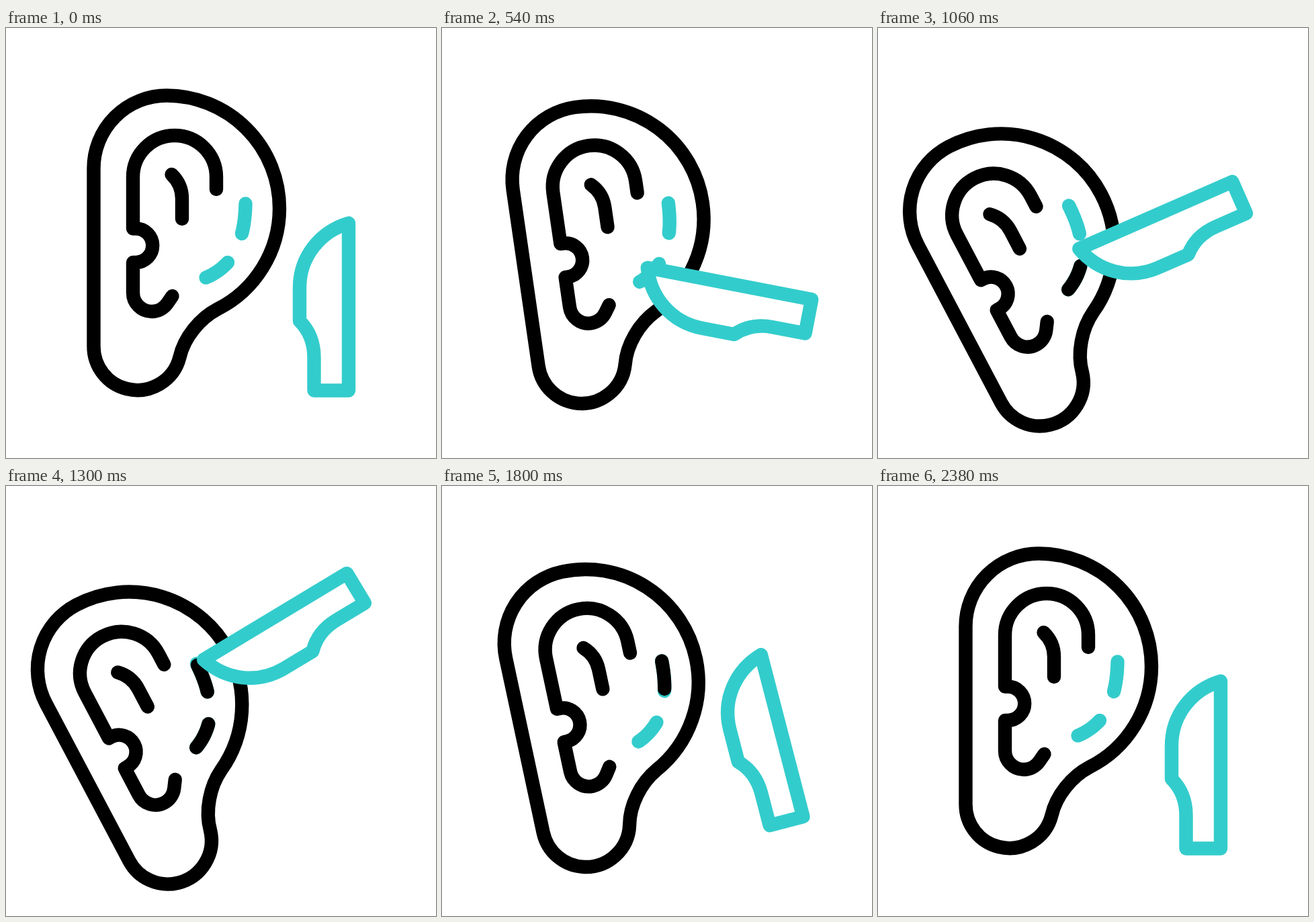
Animation of 640x640 px, one loop 2.4 s. Source, as an HTML page with a canvas:

```html
<!DOCTYPE html>
<html lang="en">
<head>
<meta charset="utf-8">
<title>Ear surgery</title>
<style>
  html, body { margin: 0; width: 100%; height: 100%; overflow: hidden; background: #fff; }
  canvas { display: block; width: 100vmin; height: 100vmin; }
</style>
</head>
<body>
<canvas id="stage" width="640" height="640"></canvas>
<script>
const ctx = document.getElementById('stage').getContext('2d');
const LOOP = 2400;
const LEAN_TIME = 1190;
const BLACK = '#000';
const TEAL = '#33cccc';
const RAD = Math.PI / 180;

const EAR_CENTER = [268, 320];
const EAR_SHIFT = [-35.2, 37.7];
const EAR_TILT = 28;
const BLADE_ANCHOR = [494.5, 512];

// Blade poses inside the ear's coordinates: time, anchor x, anchor y, tilt
const POSES = [
  [0, 494.5, 512, 0],
  [720, 518, 433.3, 77.1],
  [1040, 559.7, 357.3, 85.8],
  [1360, 591.6, 260.2, 93.5],
  [1880, 494.5, 512, 0]
];

// Quadratic curves with the spans in which the cut appears and fades
const CUTS = [
  { curve: [297.5, 371.5, 316, 364, 330, 349], draw: [720, 1040], erase: [1400, 1720] },
  { curve: [351, 306, 356, 287, 356.5, 261.5], draw: [1060, 1360], erase: [1720, 2040] }
];

const ear = new Path2D();
ear.moveTo(130.5, 209);
ear.arc(239, 209, 108.5, Math.PI, 1.5 * Math.PI);
ear.arc(239, 268.5, 168, -Math.PI / 2, 1.103);
ear.bezierCurveTo(288, 432.5, 265, 461, 258.5, 490);
ear.arc(195.5, 474, 65, 0.249, Math.PI);
ear.closePath();

const folds = new Path2D();
folds.moveTo(313, 240);
folds.arc(251, 222, 62, 0, Math.PI, true);
folds.lineTo(189, 298.5);
folds.arc(193, 323.7, 25.2, -Math.PI / 2, Math.PI / 2);
folds.lineTo(189, 349);
folds.arc(217, 394, 28, Math.PI, 0.6, true);
folds.lineTo(247.5, 399);
folds.moveTo(246.5, 218);
folds.bezierCurveTo(257, 228, 262, 240, 262, 254);
folds.lineTo(262, 284);

const blade = new Path2D(
  'M510 290.5V539.5H458.5V490C458.5 468 452 451 437 436V387C437 340 468 303 510 290.5Z');

const clamp = v => Math.min(1, Math.max(0, v));
const mix = (a, b, k) => a + (b - a) * k;

// Symmetric cubic ease with handles (h, 0) and (1 - h, 1), solved by bisection
function ease(x, h) {
  let lo = 0, hi = 1;
  for (let i = 0; i < 30; i++) {
    const s = (lo + hi) / 2, r = 1 - s;
    if (3 * r * r * s * h + 3 * r * s * s * (1 - h) + s * s * s < x) lo = s;
    else hi = s;
  }
  return lo * lo * (3 - 2 * lo);
}

const spanProgress = (t, [from, to]) => {
  const x = clamp((t - from) / (to - from));
  return x <= 0 ? 0 : x >= 1 ? 1 : ease(x, 0.6);
};

function bladePose(t) {
  let i = 0;
  while (i < POSES.length - 2 && t >= POSES[i + 1][0]) i++;
  const a = POSES[i], b = POSES[i + 1];
  const k = spanProgress(t, [a[0], b[0]]);
  return [1, 2, 3].map(n => mix(a[n], b[n], k));
}

function place(x, y, degrees, [ax, ay]) {
  ctx.translate(x, y);
  ctx.rotate(-degrees * RAD);
  ctx.translate(-ax, -ay);
}

function strokePart([x0, y0, x1, y1, x2, y2], from, to, color) {
  if (to <= from) return;
  const steps = 24;
  ctx.beginPath();
  for (let i = 0; i <= steps; i++) {
    const u = mix(from, to, i / steps), v = 1 - u;
    ctx.lineTo(v * v * x0 + 2 * u * v * x1 + u * u * x2,
               v * v * y0 + 2 * u * v * y1 + u * u * y2);
  }
  ctx.strokeStyle = color;
  ctx.stroke();
}

function draw(t) {
  ctx.setTransform(1, 0, 0, 1, 0, 0);
  ctx.fillStyle = '#fff';
  ctx.fillRect(0, 0, 640, 640);
  ctx.lineWidth = 20.4;
  ctx.lineCap = ctx.lineJoin = 'round';

  const lean = ease(clamp(1 - Math.abs(t / LEAN_TIME - 1)), 0.82);
  place(EAR_CENTER[0] + EAR_SHIFT[0] * lean, EAR_CENTER[1] + EAR_SHIFT[1] * lean,
        EAR_TILT * lean, EAR_CENTER);

  ctx.strokeStyle = BLACK;
  ctx.stroke(ear);
  ctx.stroke(folds);

  for (const cut of CUTS) {
    strokePart(cut.curve, 0, 1, TEAL);
    strokePart(cut.curve, spanProgress(t, cut.erase), spanProgress(t, cut.draw), BLACK);
  }

  const [x, y, tilt] = bladePose(t);
  place(x, y, tilt, BLADE_ANCHOR);
  ctx.fill(blade);
  ctx.strokeStyle = TEAL;
  ctx.stroke(blade);
}

let start = null;
function tick(now) {
  if (start === null) start = now;
  draw((now - start) % LOOP);
  requestAnimationFrame(tick);
}
draw(0);
requestAnimationFrame(tick);
</script>
</body>
</html>
```
